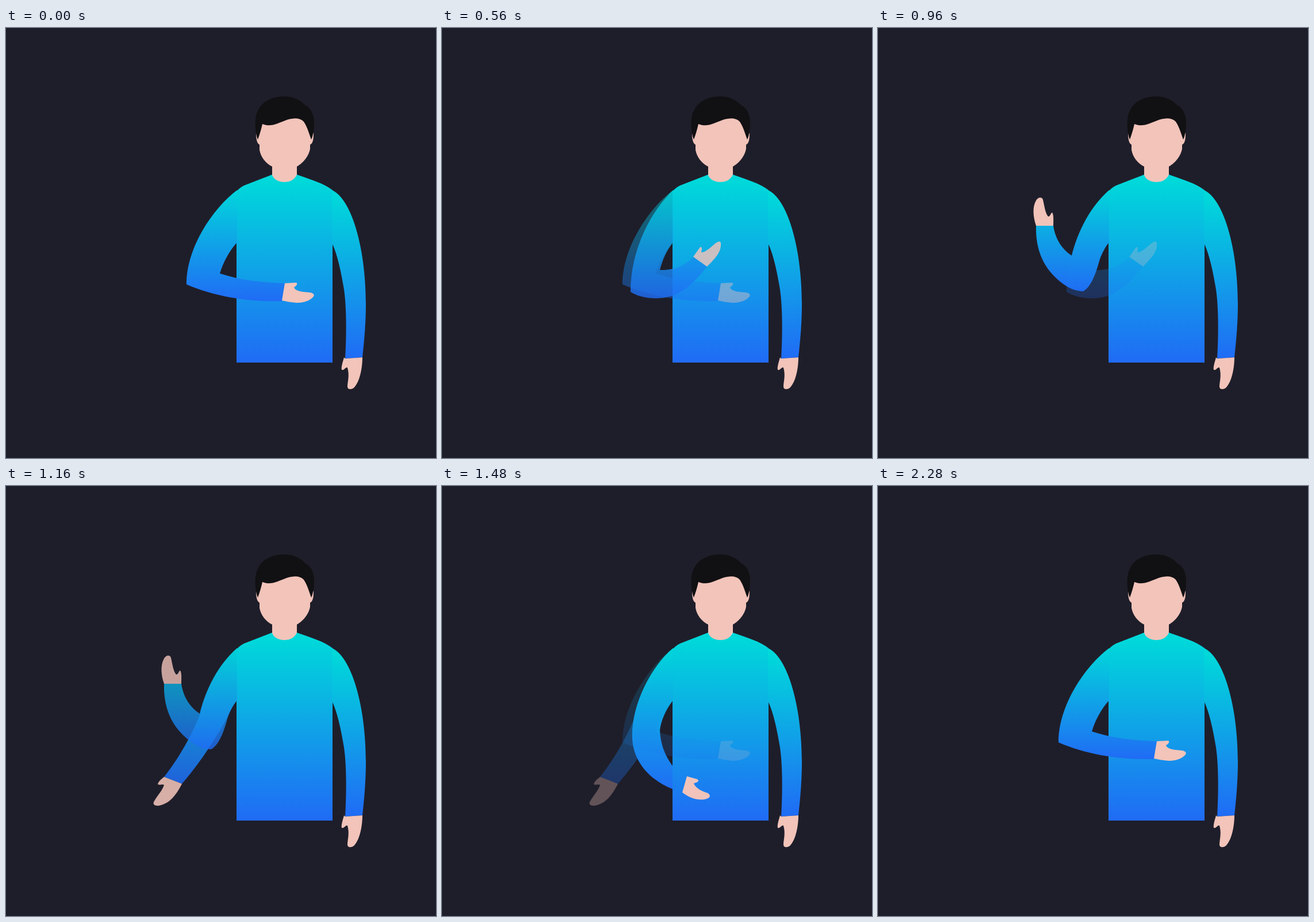
Recreate the animation shown at these times as an HTML page. Size 748 by 748 pixels, loop 2320 ms.

```html
<!DOCTYPE html>
<html lang="en">
<head>
<meta charset="utf-8">
<title>Gesturing figure</title>
<style>
  html, body { margin: 0; width: 100%; height: 100%; overflow: hidden; background: #1e1e2a; }
  svg { display: block; width: 100%; height: 100%; }
  .skin { fill: #f2c4ba; }
</style>
</head>
<body>
<svg viewBox="0 0 748 748">
  <defs>
    <linearGradient id="shirt" gradientUnits="userSpaceOnUse" x1="0" y1="255" x2="0" y2="582">
      <stop offset="0.04" stop-color="#00d8da"/><stop offset="1" stop-color="#206bf5"/>
    </linearGradient>
    <linearGradient id="sleeve" gradientUnits="userSpaceOnUse" x1="0" y1="282" x2="0" y2="575">
      <stop offset="0.04" stop-color="#00d8da"/><stop offset="1" stop-color="#206bf5"/>
    </linearGradient>
  </defs>

  <g id="back"></g>

  <path fill="url(#shirt)" d="M463 255L414 274C408 277 405 280 401 284V582H568V282C553 270 530 264 506 255Z"/>
  <path fill="url(#sleeve)" d="M567 282C600 296 626 380 626 480C626 515 623 545 620 573L590 575C592 540 593 490 588 455C583 425 577 395 567 374Z"/>
  <g class="skin">
    <path d="M588 573L590 575L620 573C620 590 616 614 606 625C601 630 594 629 594 624C594 615 598 605 594 591C591 589 589 595 585 595C582 594 585 583 589 570Z"/>
    <path d="M463 232V256C466 264 475 268 484 268C494 268 502 264 506 255V232Z"/>
    <path d="M435 183C435 195 437 201 441 203V212C443 224 452 236 463 241C475 246 495 246 506 241C518 234 527 222 529 210V203C533 201 535 196 535 184L518 150H450Z"/>
  </g>
  <path fill="#111013" d="M438 194C434 185 432 165 435 153C440 130 460 119 484 119C500 119 514 126 521 135C532 139 537 155 536 170C535 180 534 188 531 194C527 183 524 172 518 163C511 155 499 157 488 160C472 166 461 173 446 167C444 176 441 186 438 194Z"/>

  <g id="front"></g>
</svg>
<script>
const LOOP = 2320, STEP = 40;

// fade: [rise start, rise end, fall start, fall end]; end: gradient bottom of the sleeve
const poses = [
  { fade: [1180, 1450, 1500, 1930], handFade: [1180, 1450, 1470, 1700], end: 533, back: true,
    arm: 'C362 315 328 385 331 440C333 480 362 512 401 527L418 533L426 505L401 487C385 465 380 445 379 425C381 407 390 388 401 374',
    hand: 'M426 505L444 510C449 513 444 516 438 517C440 525 452 531 462 534C467 537 467 541 463 543C450 549 432 544 418 533Z' },
  { fade: [960, 1220, 1220, 1640], end: 518,
    arm: 'C370 310 348 352 337 398C325 430 300 475 275 506L306 518C335 485 365 440 385 402C390 390 395 381 401 374',
    hand: 'M275 506C270 510 265 514 264 519C268 521 272 518 275 520C272 530 262 540 258 548C254 554 259 557 266 556C284 553 296 538 306 518Z' },
  { fade: [560, 980, 1060, 1400], end: 458,
    arm: 'C370 310 348 352 337 396C320 385 308 366 305 344H275C274 375 282 405 303 428C318 444 336 458 357 458C372 450 381 420 385 405C390 390 396 380 401 374',
    hand: 'M275 344C270 330 268 312 275 300C279 293 286 294 287 299C290 312 291 322 296 328C300 328 300 322 303 321C306 325 305 335 305 344Z' },
  { fade: [240, 680, 680, 1100], end: 470,
    arm: 'C364 318 328 385 328 459C345 470 375 474 400 466C425 457 445 436 461 415L437 398C425 412 405 422 379 421C383 405 390 388 401 374',
    hand: 'M437 398L447 384C450 379 454 380 451 390C456 392 467 382 475 375C481 370 486 370 485 377C485 392 472 404 461 415Z' },
  { fade: [1400, 1700, LOOP + 250, LOOP + 810], end: 476,
    arm: 'C362 312 314 380 314 446C365 468 425 477 480 475L485 444C445 443 405 438 372 427C378 407 389 387 401 374',
    hand: 'M485 444L504 443C509 444 505 449 501 451C503 458 516 459 528 460C535 461 537 464 535 467C528 476 515 478 505 478C496 477 488 476 480 474Z' }
];

const byId = id => document.getElementById(id);

function add(parent, tag, attrs) {
  const el = document.createElementNS('http://www.w3.org/2000/svg', tag);
  for (const key in attrs) el.setAttribute(key, attrs[key]);
  return parent.appendChild(el);
}

poses.forEach((pose, i) => {
  const grad = byId('sleeve').cloneNode(true);
  grad.id = 'arm' + i;
  grad.setAttribute('y1', 270);
  grad.setAttribute('y2', pose.end);
  byId('sleeve').after(grad);
  pose.armEl = add(byId(pose.back ? 'back' : 'front'), 'path',
    { d: `M402 282${pose.arm}H402Z`, fill: `url(#arm${i})` });
  pose.handEl = add(byId('front'), 'path', { d: pose.hand, class: 'skin' });
});

function ease(t, from, to) {
  const p = Math.min(1, Math.max(0, (t - from) / (to - from)));
  return (1 - Math.cos(Math.PI * p)) / 2;
}

function opacity(t, [a, b, c, d]) {
  if (d > LOOP && t <= d - LOOP) t += LOOP;
  return ease(t, a, b) * (1 - ease(t, c, d));
}

const start = performance.now();
function draw(now) {
  const t = Math.floor(Math.max(0, now - start) % LOOP / STEP) * STEP;
  for (const pose of poses) {
    pose.armEl.setAttribute('opacity', opacity(t, pose.fade));
    pose.handEl.setAttribute('opacity', opacity(t, pose.handFade || pose.fade));
  }
  requestAnimationFrame(draw);
}
draw(start);
</script>
</body>
</html>
```
